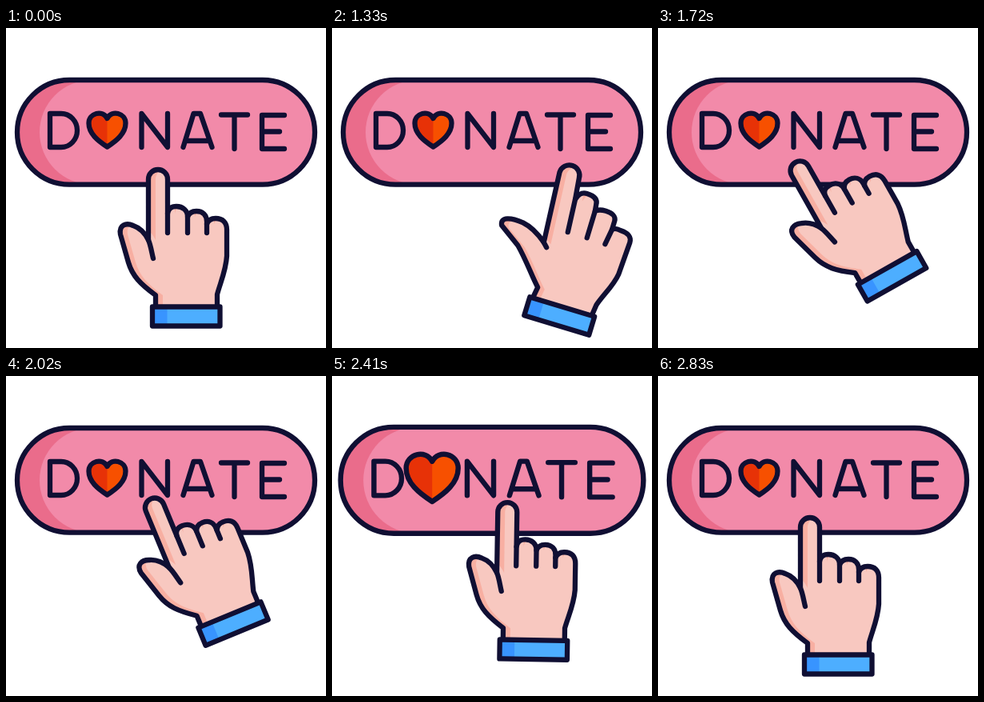
Write an HTML page that moves like this. It is 400 px wide and 400 px high and loops after 2860 ms.

```html
<!DOCTYPE html>
<html lang="en">
<head>
<meta charset="utf-8">
<title>Donate button</title>
<style>
  html, body { margin: 0; width: 100%; height: 100%; overflow: hidden; background: #fff; }
  svg { display: block; width: 100vw; height: 100vh; }
  .line { fill: none; stroke: #100f33; stroke-width: 6.3; stroke-linecap: round; stroke-linejoin: round; }
</style>
</head>
<body>
<svg viewBox="0 0 400 400" role="img" aria-label="Donate">
  <defs>
    <rect id="pill" x="14" y="65" width="372" height="130.6" rx="65.3"/>
    <path id="heartShape" d="M126.5 148.5C115 141 103.5 132 103.5 119C103.5 106 121 102 126.5 113C132 102 149.5 106 149.5 119C149.5 132 138 141 126.5 148.5Z"/>
    <path id="handShape"/>
    <clipPath id="pillClip"><use href="#pill"/></clipPath>
    <clipPath id="heartClip"><use href="#heartShape"/></clipPath>
    <clipPath id="handClip"><use href="#handShape"/></clipPath>
  </defs>

  <g id="button">
    <use href="#pill" fill="#ea6c8b"/>
    <rect x="42" y="65" width="372" height="130.6" rx="65.3" fill="#f28aa9" clip-path="url(#pillClip)"/>
    <g class="line">
      <use href="#pill"/>
      <path d="M55 107H69a20 21 0 0 1 0 42H55Z"/>
      <path d="M169.5 149V107L202 149V107"/>
      <path d="M221.5 149L234.5 107H243L257.5 149M225 141H254"/>
      <path d="M269 108.5H302M285.5 108.5V151"/>
      <path d="M348 109H320V151H348M320 129.5H342"/>
    </g>
    <g id="heart">
      <use href="#heartShape" fill="#e73207"/>
      <rect x="126.5" y="100" width="30" height="55" fill="#f75000" clip-path="url(#heartClip)"/>
      <use id="heartLine" class="line" href="#heartShape"/>
    </g>
  </g>

  <g id="hand">
    <use href="#handShape" fill="#f8afa2"/>
    <g clip-path="url(#handClip)"><use href="#handShape" x="9" fill="#f8c8c0"/></g>
    <g class="line">
      <use href="#handShape"/>
      <path id="creases"/>
    </g>
    <path d="M183 348.5h84.5v24h-84.5z" fill="#4daeff"/>
    <path d="M183 348.5h18.5v24h-18.5z" fill="#3894ff"/>
    <path class="line" d="M183 348.5h84.5v24h-84.5z"/>
  </g>
</svg>
<script>
const LOOP = 2860, HOLD = 1000, STEP = 30;
const LINE = 6.3;
const WRIST = [225.5, 360.5];
const $ = id => document.getElementById(id);

// Keys are [step, ...values]
const HAND = [
  [0, 225.5, 360.5, 0],
  [15, 297, 360, 20.4],
  [27, 292, 301, -38.7],
  [41, 276.5, 318, -6.2],
  [52, 233.5, 360.5, 6.3],
  [60, 225.5, 360.5, 0]
];
const SPREAD = [[0, 0], [15, 1.21], [24, 0]];
const PRESS = [[35, 0], [41, 9], [47, 0]];
const BUTTON = [[34, 1], [44, 1.026], [52, 1]];
const HEART = [[34, 1], [44, 1.62], [52, 0.89], [60, 1]];

const ease = u => u * u * (3 - 2 * u);

function sample(keys, step) {
  const next = keys.findIndex(key => key[0] > step);
  if (next === 0) return keys[0].slice(1);
  if (next < 0) return keys[keys.length - 1].slice(1);
  const a = keys[next - 1], b = keys[next];
  const k = ease((step - a[0]) / (b[0] - a[0]));
  return a.slice(1).map((v, i) => v + (b[i + 1] - v) * k);
}

const scaleAbout = (x, y, s) => `translate(${x} ${y}) scale(${s}) translate(${-x} ${-y})`;

// p(x, y, dx, dy): a relaxed point and how far it moves as the fingers spread
function drawHand(spread, press) {
  const p = (x, y, dx, dy) => `${x + dx * spread} ${y + dy * spread} `;
  const thumb =
    `M187 347L${p(187, 334, 2, 0)}` +
    `C${p(168, 320, 10, 3)}${p(158, 310, 7, -5)}${p(153, 293, -3, -2)}` +
    `L${p(143, 258, -19.5, 15)}` +
    `C${p(141, 246, -23, 17)}${p(150, 243, -18, 17)}${p(159, 247, -11, 15)}` +
    `C${p(168, 250, -8, 14)}${p(174, 257, -4, 13)}${p(178, 265, 2, 13)}`;
  const index =
    `L${p(178, 189 + press, -4.5, -0.7)}A12 12 0 0 1 ${p(202, 189 + press, -3, -0.2)}` +
    `L${p(202, 232, 0, -17)}`;
  const middle =
    `C${p(203, 226, 1, -18)}${p(206, 223, 1, -19)}${p(213, 223, 1, -19)}` +
    `C${p(221, 223, 2, -19)}${p(227, 228, 2, -21)}${p(227, 236, 2, -22)}` +
    `L${p(227, 236, 3, -14)}`;
  const ring =
    `C${p(229, 231, 4, -12)}${p(233, 229, 5, -11)}${p(238, 229, 5, -11)}` +
    `C${p(246, 229, 5, -11)}${p(251, 234, 6, -13)}${p(251, 242, 6, -15)}` +
    `L${p(251, 245, 6, -7)}`;
  const little =
    `C${p(253, 240, 6, -5)}${p(257, 238, 6, -3)}${p(262, 238, 6, -2)}` +
    `C${p(271, 238, 6, -2)}${p(276, 243, 7, -3)}${p(276, 252, 7, -5)}`;
  const side =
    `L${p(276, 285, 5, 4)}` +
    `C${p(275, 303, 4, 2)}${p(268, 318, 2, 1)}${p(264, 333, 1.5, 1)}L264 347`;
  $("handShape").setAttribute("d", thumb + index + middle + ring + little + side);
  $("creases").setAttribute("d",
    `M${p(178, 265, 2, 13)}C${p(181, 272, 1, 8)}${p(182, 280, 2, 2)}${p(184, 288, 1, -5)}` +
    `M${p(202, 232, 0, -17)}L${p(202, 256, 3, 1)}` +
    `M${p(227, 236, 3, -14)}L${p(227, 256, 3, 1)}` +
    `M${p(251, 245, 6, -7)}L${p(251, 256, 3, 2)}`);
}

function render(time) {
  const step = Math.max(0, Math.floor((time % LOOP - HOLD) / STEP));
  const [x, y, angle] = sample(HAND, step);
  const [beat] = sample(HEART, step);
  drawHand(sample(SPREAD, step)[0], sample(PRESS, step)[0]);
  $("hand").setAttribute("transform",
    `translate(${x} ${y}) rotate(${angle}) translate(${-WRIST[0]} ${-WRIST[1]})`);
  $("button").setAttribute("transform", scaleAbout(200, 130, sample(BUTTON, step)[0]));
  $("heart").setAttribute("transform", scaleAbout(126.5, 128, beat));
  $("heartLine").style.strokeWidth = LINE / beat;
}

const start = performance.now();
function tick() {
  render(performance.now() - start);
  requestAnimationFrame(tick);
}
tick();
</script>
</body>
</html>
```
